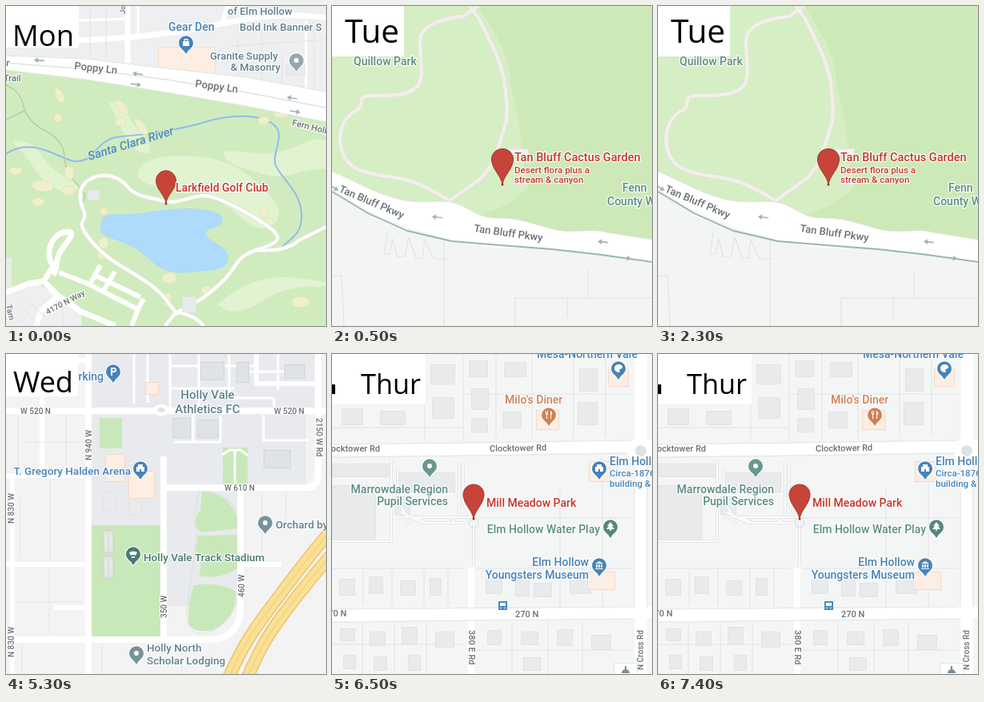
An HTML page with a canvas for the animation above (8000 ms loop, 400 by 400 pixels).

```html
<!DOCTYPE html>
<html lang="en">
<head>
<meta charset="utf-8">
<title>Weekly map</title>
<style>
html, body { margin: 0; width: 100%; height: 100%; overflow: hidden; }
canvas { display: block; width: 400px; height: 400px; }
</style>
</head>
<body>
<canvas id="map" width="400" height="400"></canvas>
<script>
const ctx = document.getElementById('map').getContext('2d');

const RED = '#c5372c', BLUE = '#4883b8', SLATE = '#5f818e', TEAL = '#5b8d84';
const STREET = '#6b7075', ORANGE = '#d18154', WATER = '#aedafb';
const PARK = '#d0ecbe', PALE = '#e1f3d1', SAND = '#f0efcc', PEACH = '#fdeee4';
const LAND = '#f3f3f4', BUILT = '#e9eaec', LOT = '#e2e3e5';

const ICON = {
  dot: 'M-3 0a3 3 0 1 0 6 0a3 3 0 1 0 -6 0Z',
  bag: 'M-4 -2H4V4H-4ZM-2.5 -2V-5H2.5V-2H1.2V-3.8H-1.2V-2Z',
  fork: 'M-4 -5H-3V-2H-2V-5H-1V-1L-2 0V5H-3V0L-4 -1ZM2 -5Q5 -4 4 0H3V5H2Z',
  tower: 'M-5 4V-2H-3V-5H3V-2H5V4H1V1H-1V4Z',
  hall: 'M0 -5L5 -2H-5ZM-4 -1H-2V3H-4ZM-1 -1H1V3H-1ZM2 -1H4V3H2ZM-5 4H5V5H-5Z',
  tree: 'M0 -6L4 -1H2L5 3H1V5H-1V3H-5L-2 -1H-4Z',
  field: 'M-5 -2Q0 -5 5 -2L3 2Q0 0 -3 2ZM-2 3H2V5H-2Z',
  park: 'M-3 5V-5H1Q4 -5 4 -2T1 1H-1V5ZM-1 -3V-1H1Q2 -1 2 -2T1 -3Z',
  palette: 'M-5 0C-5 -7 6 -6 5 -1Q4 1 1 1Q3 5 0 5Q-5 4 -5 0Z'
};

function fill(color, d) {
  ctx.fillStyle = color;
  ctx.fill(new Path2D(d));
}

function line(color, width, d) {
  ctx.strokeStyle = color;
  ctx.lineWidth = width;
  ctx.stroke(new Path2D(d));
}

function boxes(color, ...rects) {
  ctx.fillStyle = color;
  for (const r of rects) ctx.fillRect(...r);
}

function building(x, y, w, h, color = BUILT, edge = LOT) {
  boxes(color, [x, y, w, h]);
  ctx.strokeStyle = edge;
  ctx.lineWidth = 1;
  ctx.strokeRect(x + .5, y + .5, w - 1, h - 1);
}

function sand(...spots) {
  ctx.fillStyle = SAND;
  ctx.strokeStyle = '#e2e5b8';
  ctx.lineWidth = 1;
  for (const [x, y, rx, ry = rx, turn = 0] of spots) {
    ctx.beginPath();
    ctx.ellipse(x, y, rx, ry, turn, 0, 7);
    ctx.fill();
    ctx.stroke();
  }
}

function label(text, x, y, color, { size = 14, turn = 0, align = 'left', style = '500', halo = 'rgba(255,255,255,.85)' } = {}) {
  ctx.save();
  ctx.translate(x, y);
  ctx.rotate(turn * Math.PI / 180);
  ctx.font = `${style} ${size}px Roboto, sans-serif`;
  ctx.textAlign = align;
  ctx.strokeStyle = halo;
  ctx.lineWidth = 2.5;
  ctx.strokeText(text, 0, 0);
  ctx.fillStyle = color;
  ctx.fillText(text, 0, 0);
  ctx.restore();
}

function street(text, x, y, turn = 0, size = 10) {
  label(text, x, y, STREET, { size, turn });
}

function arrow(x, y, turn = 0) {
  ctx.save();
  ctx.translate(x, y);
  ctx.rotate(turn * Math.PI / 180);
  line('#a3b5af', 1.6, 'M-6 0H6');
  fill('#a3b5af', 'M-7 0L-2 -3.5V3.5Z');
  ctx.restore();
}

function pin(x, y, r = 13) {
  ctx.save();
  ctx.translate(x, y - 2.3 * r);
  ctx.scale(r / 10, r / 10);
  fill('#c64439', 'M0 23C-1 14 -10 9 -10 0A10 10 0 0 1 10 0C10 9 1 14 0 23Z');
  line('#a93a30', .8, 'M0 23C-1 14 -10 9 -10 0A10 10 0 0 1 10 0C10 9 1 14 0 23Z');
  ctx.restore();
  fill('#9c2f27', `M${x - 1.5} ${y}a1.5 1.5 0 1 0 3 0a1.5 1.5 0 1 0 -3 0Z`);
}

function marker(x, y, color, icon) {
  ctx.save();
  ctx.translate(x, y);
  const drop = 'M0 14Q-2 10 -6 7A9 9 0 1 1 6 7Q2 10 0 14Z';
  line('#ffffff', 2, drop);
  fill(color, drop);
  fill('#ffffff', ICON[icon]);
  ctx.restore();
}

function day(text, x, y, right, bottom) {
  boxes('#ffffff', [0, 0, right, bottom]);
  const font = size => `condensed ${size}px "Open Sans", "Noto Sans", sans-serif`;
  ctx.font = font(45);
  const room = right - x - 6;
  ctx.font = font(Math.min(45, 45 * room / ctx.measureText(text).width));
  ctx.textAlign = 'left';
  ctx.fillStyle = '#000000';
  ctx.fillText(text, x, y);
}

function monday() {
  boxes(PARK, [0, 0, 400, 400]);
  fill('#eeeff0', 'M0 0H400V110L200 80L100 68L0 66Z');
  line('#ffffff', 7, 'M90 43Q200 38 270 22T400 15M152 0V74M270 22L278 0');
  line('#ffffff', 3, 'M165 0V38M90 18L152 16M375 18V105');
  line(LOT, 1, 'M105 0V65M125 0V66M290 38V88M320 30V94M345 60V100M385 20V105M282 50L400 42');
  building(190, 51, 72, 34, PEACH, '#f5dfd0');
  building(350, 72, 24, 15);

  fill(PALE, 'M128 122Q140 116 149 132T174 164Q187 185 174 184Q158 183 148 160T128 122Z');
  fill(PALE, 'M165 208C174 183 219 186 254 190C293 196 326 228 339 250C349 275 319 287 300 269C276 249 254 231 225 229C190 229 162 222 165 208Z');
  fill(PALE, 'M272 183C286 176 318 191 347 181C370 175 389 160 400 169V204C368 201 350 220 321 210C301 203 270 198 272 183Z');
  fill(PALE, 'M8 170Q30 164 45 187T87 220Q96 235 76 232Q52 229 38 207T8 170Z');
  fill(PALE, 'M265 373Q310 332 367 340T391 351Q351 348 318 370T265 373Z');

  line('#91bbee', 2, 'M0 185C18 172 38 175 59 184S88 198 101 191S117 165 145 163S220 154 249 145S314 134 333 147S331 184 337 199S366 230 369 256S360 288 345 301');
  line('#b9cbb0', 1.5, 'M0 99Q18 106 22 125T49 156T73 188T89 223T96 244M0 142Q16 135 24 130');

  sand([67, 112, 5, 10, -.4], [65, 140, 5], [145, 127, 5, 11, -.7], [143, 145, 7, 5],
    [169, 151, 5, 12, -.6], [317, 119, 6, 4], [322, 143, 7, 5], [347, 134, 12, 5, -.2],
    [12, 206, 8, 5], [46, 225, 14, 7, .1], [79, 209, 6, 9], [78, 231, 8, 6],
    [40, 245, 8, 5], [322, 257, 5, 8, -.3], [329, 270, 6, 5], [122, 256, 5],
    [122, 296, 6, 7], [119, 311, 5], [204, 340, 9, 7], [202, 367, 5, 9], [251, 355, 7, 5], [368, 370, 11, 7]);
  fill(WATER, 'M119 270C121 255 145 263 168 259S222 251 245 254S273 263 270 271S246 277 250 286S273 298 277 311S269 330 251 331S205 340 184 321S153 298 136 292S116 285 119 270Z');

  const cart = 'M106 216C122 207 142 213 152 226S184 240 199 244S232 237 247 237S297 255 321 271S348 294 316 304S291 325 270 345S228 377 212 383L199 400M106 216C93 222 89 238 96 253S91 268 96 278S115 307 139 322S190 350 205 374L215 386M311 305Q350 308 366 293L400 276M216 383Q237 387 247 400';
  line('#dce7d0', 6, cart);
  line('#ffffff', 4, cart);
  building(102, 230, 15, 13);
  building(220, 363, 18, 20);

  fill('#eeeff0', 'M0 354L39 347L65 360L94 380V400H0Z');
  boxes('#e8ece7', [0, 315, 7, 40]);
  line('#ffffff', 7, 'M0 358L28 347L47 344L65 362L43 382L38 400M47 344L59 325C47 308 58 286 72 283S84 286 72 301S66 326 59 336M65 362L94 382L137 400');
  line('#ffffff', 6, 'M66 333L102 347L139 366L165 379L157 400M118 324L105 348M136 332L122 356M112 337L168 364M165 379L172 366');
  line(LOT, 1, 'M15 370L41 400M23 365L52 391M0 382L28 400M71 373V400');

  fill('#ffffff', 'M0 62L100 66L200 78L300 89L400 107V145L300 125L200 108L100 92L0 80Z');
  line('#e1e5df', 1, 'M0 62L100 66L200 78L300 89L400 107M0 80L100 92L200 108L300 125L400 145');
  line('#dfe3e4', 1.5, 'M0 71L100 79L200 92L300 108L400 127');
  arrow(42, 68, 4);
  arrow(165, 85, 8);
  arrow(162, 98, 188);
  arrow(358, 115, 9);
  arrow(361, 132, 189);

  street('Poppy Ln', 85, 79, 6, 13);
  street('Poppy Ln', 236, 101, 8, 13);
  street('Fern Holl', 357, 149, 14, 11);
  street('r', 0, 75, 4, 12);
  street('Trail', -3, 94, 0, 11);
  street('4170 N Way', 52, 386, -28);
  street('Tarn', 0, 374, 78);
  street('Jo', 149, 10, -90, 9);
  label('of Elm Hollow', 277, 11, SLATE, { size: 13 });
  label('Bold Ink Banner S', 292, 31, SLATE, { size: 13 });
  label('Gear Den', 203, 31, BLUE);
  marker(225, 46, BLUE, 'bag');
  label('Granite Supply', 255, 67, SLATE, { size: 13 });
  label('& Masonry', 343, 81, SLATE, { size: 13, align: 'right' });
  marker(363, 68, '#98a6ad', 'dot');
  label('Santa Clara River', 104, 193, '#4e8bc6', { size: 15, turn: -17, style: 'italic 500', halo: 'rgba(208,236,190,.8)' });
  pin(200, 247, 12.5);
  label('Larkfield Golf Club', 212, 232, RED);
  day('Mon', 8, 50, 91, 52);
}

function tuesday() {
  boxes('#cde9b7', [0, 0, 400, 400]);
  fill('#d6eec4', 'M0 0H183L207 40Q221 63 224 102Q236 143 237 180L246 225Q217 258 163 265L0 240Z');
  fill('#f3f4f4', 'M0 224L94 270L150 286L275 300L400 313V400H0Z');
  line(LOT, 1.2, 'M69 282L65 310H72L76 291L81 313H91L96 289L105 315H113L116 292L127 316H144M140 293V400M229 400V365H400M294 365V390M0 337H12L15 400M320 330V365');
  const trail = 'M186 -3L164 13C140 15 111 23 110 43S117 92 105 102S75 112 51 112S43 124 31 130S5 153 12 180S45 209 76 214S119 227 147 243L184 217C205 199 207 176 214 157S219 125 216 98S195 39 184 16L172 0M147 243V262';
  line('#dce2ce', 6, trail);
  line('#f2efea', 4.5, trail);

  fill('#ffffff', 'M0 207C22 215 50 233 82 241S132 241 152 246S181 266 209 265S268 279 288 281S328 278 344 283L400 292V322L345 312L302 306L271 303L203 302L149 293L94 277L47 257L0 229Z');
  line('#dfe4de', 1, 'M0 207C22 215 50 233 82 241S132 241 152 246S181 266 209 265S268 279 288 281S328 278 344 283L400 292');
  line('#98b7aa', 1.8, 'M0 232L45 259L94 281L150 294L210 299L275 304L337 311L400 320');
  building(220, 178, 26, 9, '#eff1eb');
  building(230, 218, 15, 6, '#eff1eb');
  arrow(2, 227, 211);
  arrow(132, 264, 7);
  arrow(339, 295, 6);
  arrow(367, 315, 187);

  street('Tan Bluff Pkwy', 8, 232, 23, 13);
  street('Tan Bluff Pkwy', 177, 282, 8, 13);
  label('Quillow Park', 27, 74, TEAL);
  label('Fenn', 363, 232, TEAL);
  label('County W', 344, 249, TEAL);
  pin(213, 223, 13.5);
  label('Tan Bluff Cactus Garden', 228, 194, RED, { size: 14.5 });
  label('Desert flora plus a', 228, 209, RED, { size: 11.5 });
  label('stream & canyon', 228, 221, RED, { size: 11.5 });
  day('Tue', 16, 46, 90, 63);
}

function wednesday() {
  boxes(LAND, [0, 0, 400, 400]);
  fill('#e8eaed', 'M106 0H388V68H375V163H293V357H106Z');
  boxes(LAND, [199, 170, 94, 187], [303, 169, 97, 231]);
  boxes('#e8eaed', [199, 170, 92, 145]);
  boxes('#c9e8b9', [105, 214, 91, 142], [117, 80, 28, 38], [271, 117, 31, 47]);
  fill('#c9e8b9', 'M245 171Q277 174 289 203V218L244 223Q234 215 238 202L243 196Z');
  fill('#c9e8b9', 'M240 227L289 226V268Q267 283 241 277Q247 263 237 246Z');
  fill('#c9e8b9', 'M235 289Q270 284 288 298Q287 332 258 345Q238 350 229 339Q225 319 235 289Z');
  line('#dce0e3', 1, 'M242 171Q283 174 291 205V300Q284 338 248 350Q224 350 226 320L239 223L234 205ZM271 140H302');

  line('#ffffff', 8, 'M103 0V400M0 71H400M0 357H251Q288 358 293 324V167M197 128V357M197 167H376Q390 167 390 150V0');
  line('#ffffff', 6, 'M0 152H103M0 263H103M8 152V400M45 71V152M293 263H344M0 8H100M45 0V71M103 317H60M313 0V37H388');
  line('#ffffff', 3, 'M205 0V70M241 0V70M279 0V55H335V72M160 0V62M177 0V61M204 15H310M205 43H285M340 0V45M300 22H365M210 110H268V77M234 74V111M270 126L280 120H293L303 127M286 120V167M322 76V108H378');
  line(LOT, 1, 'M15 80V145M75 76V147M20 110H99M18 178V254M55 157V258M14 310H96M54 268V350M320 175V255M350 172V205M380 235V305M120 362V400M220 362V400M20 362V400');
  fill('#ffffff', 'M184 70A10 7 0 1 0 204 70A10 7 0 1 0 184 70Z');
  fill('#e0e3e5', 'M189 70A5 3 0 1 0 199 70A5 3 0 1 0 189 70Z');

  building(153, 146, 33, 35, PEACH, '#f3d9c8');
  building(124, 125, 25, 35, PEACH, '#f3d9c8');
  building(174, 35, 17, 16, PEACH, '#f3d9c8');
  building(121, 172, 17, 24);
  building(153, 183, 17, 19);
  for (const [x, y, w, h] of [[208, 80, 23, 25], [239, 82, 27, 23], [322, 120, 34, 23], [243, 10, 30, 23], [288, 10, 16, 26], [348, 13, 26, 18]]) {
    building(x, y, w, h, '#e0e3e6', '#d1d5d8');
  }
  for (const y of [220, 252]) {
    building(121, y, 14, 29, '#dfe3e0', '#cdd3cf');
    line('#f3f5f3', 1, `M125 ${y + 4}V${y + 25}M131 ${y + 4}V${y + 25}`);
  }

  const lanes = 'M409 218C380 250 350 291 329 319S296 365 278 405M426 229C391 268 370 294 347 325S317 370 300 408';
  line('#edc36b', 16, lanes);
  line('#fae094', 13, lanes);
  line('#efc975', 1, lanes);

  street('W 520 N', 18, 75);
  street('W 520 N', 335, 75);
  street('W 610 N', 273, 171);
  street('N 940 W', 107, 133, -90);
  street('350 W', 201, 330, -90);
  street('460 W', 298, 304, -90);
  street('N 830 W', 10, 212, -90);
  street('N 830 W', 10, 379, -90);
  street('2150 W Rd', 388, 80, 90);
  label('arking', 122, 33, BLUE, { align: 'right' });
  marker(134, 22, BLUE, 'park');
  label('Holly Vale', 252, 56, SLATE, { size: 15, align: 'center' });
  label('Athletics FC', 252, 74, SLATE, { size: 15, align: 'center' });
  label('T. Gregory Halden Arena', 156, 151, BLUE, { align: 'right', size: 13.5 });
  marker(168, 143, BLUE, 'tower');
  label('Holly Vale Track Stadium', 172, 259, '#477a74', { size: 13.5 });
  marker(159, 250, '#477a74', 'field');
  label('Orchard by', 337, 218, SLATE, { size: 13.5 });
  marker(324, 211, '#78929b', 'dot');
  label('Holly North', 176, 372, SLATE, { size: 13.5 });
  label('Scholar Lodging', 176, 388, SLATE, { size: 13.5 });
  marker(163, 374, '#78929b', 'dot');
  day('Wed', 9, 48, 90, 53);
}

function thursday() {
  boxes('#f4f5f5', [0, 0, 400, 400]);
  line(LOT, 1, 'M0 92H164M116 0V108M164 0V108M205 0V105M250 0V105M302 0V105M342 0V105M164 50H375M0 268H165M181 268H375M39 270V315M75 270V315M115 270V315M145 270V315M285 170V316M338 130V316M181 205H375M0 363H165M38 335V400M78 335V400M118 335V400M182 370H375M225 335V400M270 335V400M313 335V400');
  line('#ffffff', 15, 'M0 121L165 119L400 115M0 327L400 323M386 0V400');
  line('#ffffff', 8, 'M174 267V400');
  line(LOT, 1, 'M0 113L165 111L375 108M0 129L165 127L375 124M0 319L376 316M0 335L376 331M378 130V317M394 130V317');
  fill('#ffffff', 'M370 121A16 16 0 1 0 402 121A16 16 0 1 0 370 121Z');
  fill('#dfe2e3', 'M379 121A7 7 0 1 0 393 121A7 7 0 1 0 379 121Z');

  for (const [x, y, w, h] of [
    [123, 13, 31, 25], [125, 54, 28, 27], [171, 8, 24, 21], [174, 43, 22, 27], [174, 80, 21, 18],
    [215, 10, 28, 19], [213, 72, 24, 21], [309, 18, 23, 29], [307, 60, 25, 29], [12, 68, 27, 21], [60, 71, 32, 18],
    [0, 137, 74, 17], [0, 164, 55, 69], [82, 148, 72, 25], [78, 178, 20, 23],
    [9, 281, 20, 21], [46, 278, 18, 22], [85, 283, 20, 19], [122, 280, 15, 22], [192, 281, 21, 19],
    [229, 278, 18, 25], [252, 286, 23, 18], [297, 283, 27, 17], [10, 343, 19, 16], [47, 347, 20, 18],
    [87, 341, 20, 22], [129, 347, 24, 20], [194, 345, 18, 19], [236, 347, 22, 17], [281, 344, 20, 21],
    [324, 351, 25, 19], [14, 376, 16, 18], [52, 378, 17, 18], [95, 376, 16, 20], [239, 379, 22, 17]
  ]) building(x, y, w, h);
  building(255, 70, 29, 25, PEACH, '#f3d9c8');
  building(345, 19, 26, 22, PEACH, '#f3d9c8');
  building(321, 134, 27, 26, PEACH, '#f3d9c8');
  building(319, 272, 35, 23, PEACH, '#f3d9c8');
  const walks = 'M74 133V234H0M80 204H177M86 198L114 211H168M82 141V184L95 205M159 134V200M164 138V187L177 210M177 210V265M92 212L106 204L118 212M145 203L157 213';
  line('#dddfe1', 4, walks);
  line('#fafafa', 2.5, walks);
  line('#d7dadb', 1, 'M171 211A6 6 0 1 0 183 211A6 6 0 1 0 171 211Z');

  label('Mesa-Northern Vale', 256, 5, BLUE);
  marker(358, 18, BLUE, 'palette');
  label("Milo's Diner", 216, 62, ORANGE);
  marker(271, 76, ORANGE, 'fork');
  label('Clocktower Rd', 60, 122, STREET, { size: 11, align: 'right' });
  street('Clocktower Rd', 197, 122, -1, 11);
  label('Marrowdale Region', 145, 174, TEAL, { align: 'right' });
  label('Pupil Services', 145, 189, TEAL, { align: 'right' });
  marker(122, 140, '#68988d', 'dot');
  label('Elm Holl', 347, 139, BLUE);
  label('Circa-1876', 347, 153, BLUE, { size: 11.5 });
  label('building &', 347, 166, BLUE, { size: 11.5 });
  marker(334, 143, BLUE, 'tower');
  pin(177, 206, 13);
  label('Mill Meadow Park', 193, 191, RED);
  label('Elm Hollow Water Play', 335, 224, TEAL, { align: 'right' });
  marker(348, 216, '#55877e', 'tree');
  label('Elm Hollow', 321, 265, BLUE, { align: 'right' });
  label('Youngsters Museum', 321, 281, BLUE, { align: 'right' });
  marker(334, 264, BLUE, 'hall');
  street('270 N', -11, 328, 0, 11);
  street('270 N', 229, 329, 0, 11);
  street('380 E Rd', 171, 345, 90, 11);
  street('N Cross Rd', 389, 395, -90, 10);
  boxes('#438bca', [208, 309, 11, 11]);
  boxes('#ffffff', [210, 311, 7, 4], [210, 317, 2, 1], [215, 317, 2, 1]);
  building(352, 386, 30, 16, '#ffffff', '#e2e3e5');
  fill('#789097', 'M362 399A5 5 0 1 1 372 399ZM366 390H368V396H366Z');
  day('Thur', 36, 50, 117, 63);
  boxes('#000000', [0, 38, 4, 12]);
}

const scenes = [
  { until: 500, draw: monday },
  { until: 3500, draw: tuesday },
  { until: 6500, draw: wednesday },
  { until: 8000, draw: thursday }
];
const start = performance.now();
let shown = null;

function frame() {
  const time = (performance.now() - start) % 8000;
  const scene = scenes.find(s => time < s.until);
  if (scene !== shown) {
    ctx.lineJoin = 'round';
    ctx.clearRect(0, 0, 400, 400);
    scene.draw();
    shown = scene;
  }
  requestAnimationFrame(frame);
}
frame();
</script>
</body>
</html>
```
